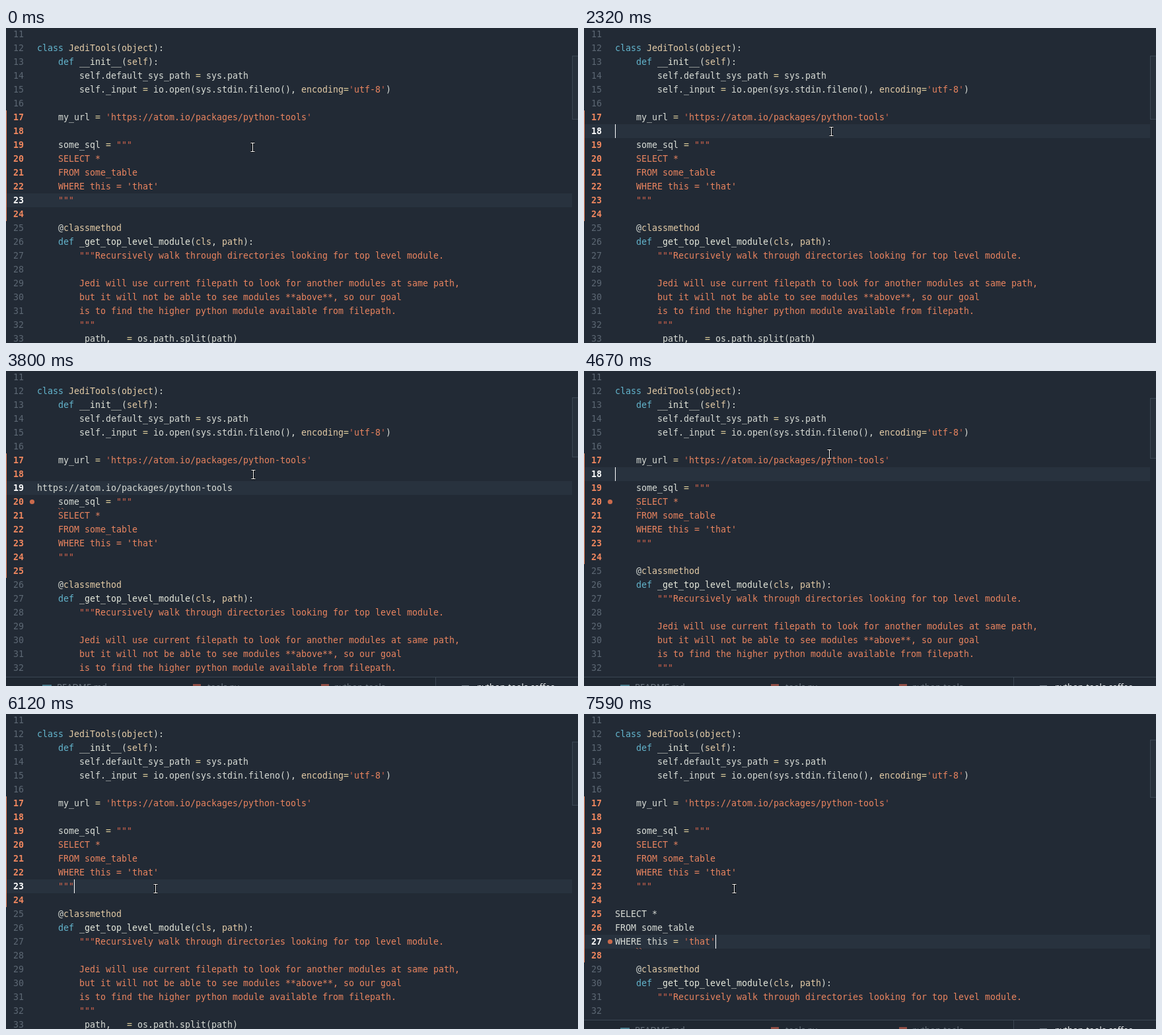
Recreate the animation shown at these times as an HTML page with a canvas. Size 866 px wide and 478 px high, loop 7680 ms.

```html
<!DOCTYPE html>
<html lang="en">
<head>
<meta charset="utf-8">
<title>Selecting strings in an editor</title>
<style>
  html, body { margin: 0; width: 100%; height: 100%; overflow: hidden; background: #222a35; }
  canvas { display: block; }
</style>
</head>
<body>
<canvas id="stage" width="866" height="478"></canvas>
<script>
const ctx = document.getElementById('stage').getContext('2d');
const LOOP = 7680, LEFT = 47, CHAR = 8, ROW = 21, FIRST = 11;
const MONO = '13.29px "DejaVu Sans Mono", monospace';
const C = {
  bg: '#222a35', row: '#28323e', select: '#344453', frame: '#dce4ea', number: '#5c6773',
  accent: '#f0875f', text: '#d8dcd6', string: '#e9845f', quote: '#d3644d', tick: '#a9604f',
  keyword: '#63b4cc', name: '#e3cba6', func: '#e6e9dc', op: '#e0cf9c', border: '#3b4753'
};

const code = `
class JediTools(object):
    def __init__(self):
        self.default_sys_path = sys.path
        self._input = io.open(sys.stdin.fileno(), encoding='utf-8')

    my_url = 'https://atom.io/packages/python-tools'

    some_sql = """
    SELECT *
    FROM some_table
    WHERE this = 'that'
    """

    @classmethod
    def _get_top_level_module(cls, path):
        """Recursively walk through directories looking for top level module.

        Jedi will use current filepath to look for another modules at same path,
        but it will not be able to see modules **above**, so our goal
        is to find the higher python module available from filepath.
        """
        _path, _ = os.path.split(path)`.split('\n');

const url = 'https://atom.io/packages/python-tools';
const query = ['SELECT *', 'FROM some_table', "WHERE this = 'that'"];
const urlSelection = [[17, 14, 51]];
const sqlSelection = [[20, 4, 12], [21, 4, 19], [22, 4, 23]];

// Each step changes part of the editor state; col null hides the caret.
const steps = [
  [0, { row: 23, col: null, at: 0, insert: [], select: [], panel: 0, dot: 0 }],
  [750, { row: 17, col: 41 }],
  [1130, { col: null }],
  [1390, { select: urlSelection }],
  [2190, { select: [], col: 51 }],
  [2290, { row: 18, col: 0 }],
  [2690, { col: null }],
  [2980, { row: 19, col: 0, at: 19, insert: [''] }],
  [3390, { insert: [url], col: 37 }],
  [3520, { panel: 14, dot: 20 }],
  [3800, { col: null }],
  [3930, { panel: 54 }],
  [4240, { row: 18, col: 0, insert: [] }],
  [4500, { panel: 14 }],
  [4710, { panel: 0, dot: 0 }],
  [4820, { col: null }],
  [5110, { row: 21, col: 18 }],
  [5380, { select: sqlSelection, col: null }],
  [6040, { select: [], row: 23, col: 7 }],
  [6250, { col: null }],
  [6570, { row: 24, col: 4, at: 24, insert: [''] }],
  [6720, { row: 25, insert: ['', ''] }],
  [7030, { col: 0 }],
  [7370, { row: 27, col: 19, insert: ['', ...query] }],
  [7590, { panel: 14, dot: 27 }]
];

const pointer = [
  [0, 373.5, 181], [170, 373.5, 181], [450, 372, 139], [970, 372, 139], [1210, 376.5, 153],
  [1880, 376.5, 153], [1920, 374.5, 157], [4420, 374.5, 157], [4670, 371.5, 126],
  [5070, 190, 222], [5380, 190, 222], [5660, 224, 282], [5880, 224, 282],
  [6040, 226.5, 265], [6570, 226.5, 265], [6640, 227.5, 265], [LOOP, 227.5, 265]
];

const rowTop = n => 125 + (n - 17) * ROW;
const colX = c => LEFT + c * CHAR;

function box(color, x, y, w, h) {
  ctx.fillStyle = color;
  ctx.fillRect(x, y, w, h);
}

function write(text, x, y, color, font = MONO) {
  ctx.font = font;
  ctx.fillStyle = color;
  ctx.fillText(text, x, y);
}

function drawCode(lines) {
  let block = false;
  lines.forEach((line, i) => {
    const y = rowTop(FIRST + i) + 15;
    const declares = /^\s*(def|class) /.test(line);
    let quoted = false, inArgs = false, previous = '';
    for (const { 0: token, index } of line.matchAll(/"""|\w+|[^\w\s]/g)) {
      let color = C.text;
      if (token === '"""') {
        block = !block;
        color = C.quote;
      } else if (block) color = C.string;
      else if (token === "'") {
        quoted = !quoted;
        color = C.quote;
      } else if (quoted) color = C.string;
      else if (token === 'class' || token === 'def') color = C.keyword;
      else if (previous === 'def') color = C.func;
      else if (previous === 'class' || token === 'encoding' || token === 'classmethod') color = C.name;
      else if (token === '=') color = C.op;
      else if (declares && token === '(') inArgs = true;
      else if (inArgs && /\w/.test(token)) color = C.name;
      write(token, colX(index), y, color);
      previous = token;
    }
  });
}

function drawGutter(count, s) {
  const lastChanged = 24 + s.insert.length;
  for (let n = FIRST; n < FIRST + count; n++) {
    const changed = n >= 17 && n <= lastChanged;
    const active = s.select.length ? s.select.some(([r]) => r === n) : n === s.row;
    const color = active ? '#fff' : changed ? C.accent : C.number;
    write(n, 11, rowTop(n) + 15, color, (active || changed ? 'bold ' : '') + MONO);
  }
  box(C.accent, 0, rowTop(17), 1, (lastChanged - 16) * ROW);
}

function drawSelection([row, from, to]) {
  const y = rowTop(row);
  box(C.select, 1, y, LEFT - 1, ROW);
  ctx.beginPath();
  ctx.roundRect(colX(from) + .5, y + .5, (to - from) * CHAR - 1, ROW - 1, 2);
  ctx.fillStyle = C.select;
  ctx.fill();
  ctx.strokeStyle = C.frame;
  ctx.lineWidth = 1;
  ctx.stroke();
}

function drawWarning(row) {
  const y = rowTop(row);
  ctx.fillStyle = '#ca6a4c';
  ctx.beginPath();
  ctx.arc(39.5, y + 10.5, 3.6, 0, 7);
  ctx.fill();
  for (const x of [79, 84]) {
    box(C.tick, x, y + 20, 2, 1);
    box(C.tick, x + 2, y + 21, 1, 1);
  }
}

function drawScrollbar(s) {
  const extra = s.insert.length;
  const top = Math.round(42 - .6 * extra - .075 * s.panel);
  const height = Math.round(97 - .8 * extra - .38 * s.panel);
  box(C.bg, 857, 0, 9, 478);
  box(C.border, 857, top, 9, height);
  box('#27303b', 858, top + 1, 8, height - 2);
}

function drawTabs(top) {
  const font = '13px "Noto Sans", sans-serif';
  box(C.bg, 0, top, 866, 478 - top);
  box('#1f2731', 0, top, 650, 35);
  box(C.border, 0, top, 866, 1);
  box(C.border, 650, top, 1, 35);
  box(C.border, 0, top + 35, 650, 1);
  box('#47798a', 55, top + 12, 14, 10);
  box('#8f4d45', 283, top + 11, 12, 12);
  box('#8f4d45', 477, top + 11, 12, 12);
  box('#78828c', 690, top + 13, 11, 10);
  const labels = [['README.md', 77], ['tools.py', 305], ['python-tools', 497]];
  for (const [label, x] of labels) write(label, x, top + 20, '#6d7781', font);
  write('python-tools.coffee', 713, top + 20, '#f1f3f4', font);
}

function drawPointer(t) {
  const i = pointer.findIndex(p => p[0] > t);
  const [t0, x0, y0] = pointer[i - 1], [t1, x1, y1] = pointer[i];
  const k = (t - t0) / (t1 - t0);
  const x = Math.floor(x0 + (x1 - x0) * k) + .5, y = Math.round(y0 + (y1 - y0) * k);
  ctx.beginPath();
  ctx.moveTo(x, y - 6);
  ctx.lineTo(x, y + 6);
  for (const end of [y - 6.5, y + 6.5]) {
    ctx.moveTo(x - 3, end);
    ctx.lineTo(x + 3, end);
  }
  for (const [color, width] of [['#080b0f', 3], ['#fff', 1]]) {
    ctx.strokeStyle = color;
    ctx.lineWidth = width;
    ctx.stroke();
  }
}

function draw(now) {
  const t = now % LOOP;
  const s = Object.assign({}, ...steps.filter(step => step[0] <= t).map(step => step[1]));
  const lines = code.slice();
  lines.splice(s.at - FIRST, 0, ...s.insert);

  box(C.bg, 0, 0, 866, 478);
  if (s.select.length) s.select.forEach(drawSelection);
  else box(C.row, 0, rowTop(s.row), 857, ROW);
  drawCode(lines);
  drawGutter(lines.length, s);
  if (s.col !== null) box('#fff', colX(s.col), rowTop(s.row), 1, ROW);
  if (s.dot) drawWarning(s.dot);
  drawScrollbar(s);
  if (s.panel) drawTabs(478 - s.panel);
  drawPointer(t);
  requestAnimationFrame(draw);
}
requestAnimationFrame(draw);
</script>
</body>
</html>
```
